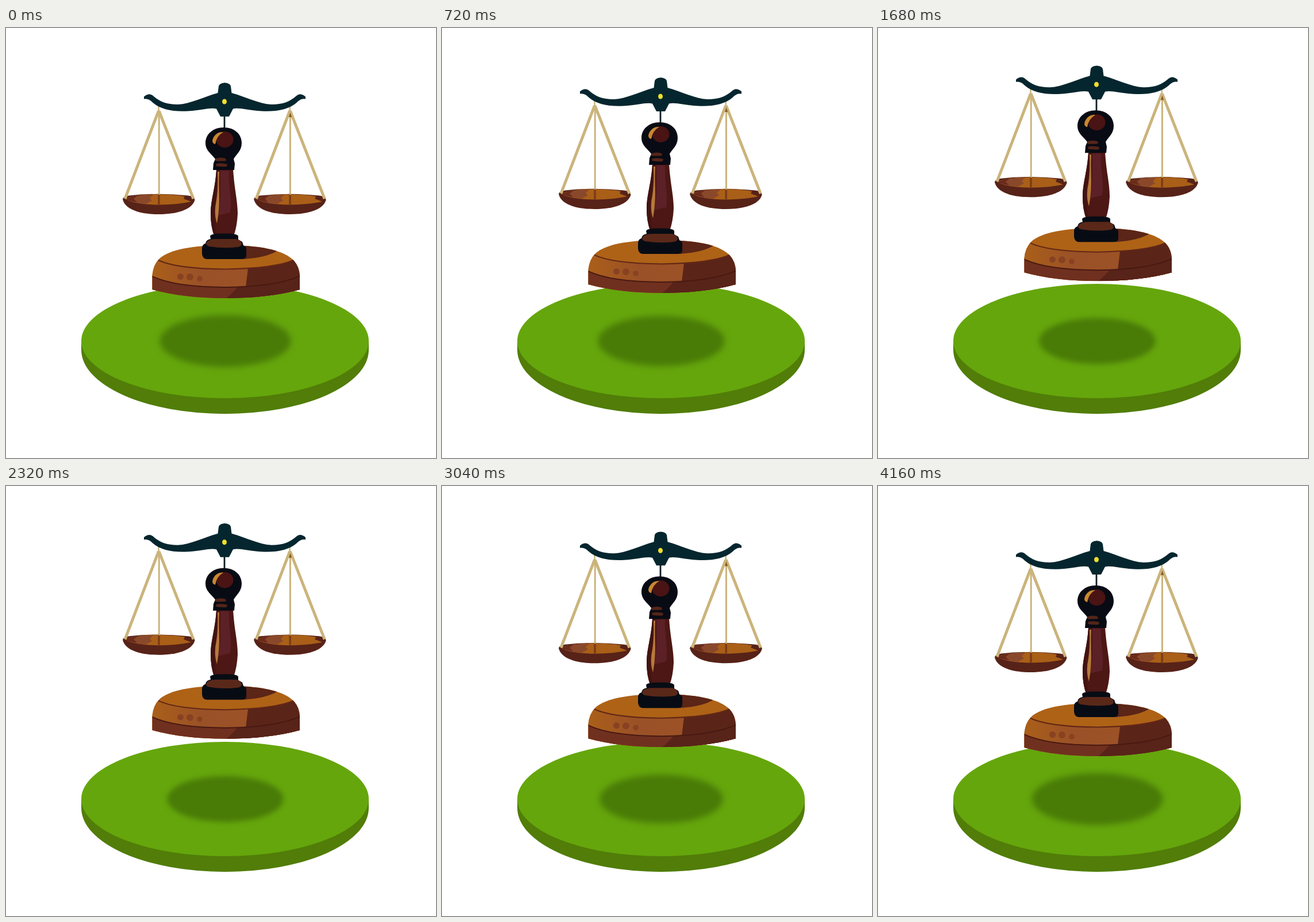
These frames come from a looping animation (748x748 px, 4240 ms). An HTML page:

```html
<!DOCTYPE html>
<html lang="en">
<head>
<meta charset="utf-8">
<title>Floating scales</title>
<style>
  html, body { margin: 0; width: 100%; height: 100%; overflow: hidden; background: #fff; }
  svg { display: block; width: 100%; height: 100%; }
</style>
</head>
<body>
<svg viewBox="0 0 748 748">
  <defs>
    <filter id="soft" x="-20%" y="-30%" width="140%" height="160%" color-interpolation-filters="sRGB">
      <feGaussianBlur stdDeviation="5.500"/>
    </filter>
    <linearGradient id="band">
      <stop offset="0" stop-color="#ab6018"/>
      <stop offset=".35" stop-color="#9a5127"/>
      <stop offset="1" stop-color="#9f5326"/>
    </linearGradient>
    <clipPath id="baseShape">
      <path d="M254.500 455V430Q256 412 267 401C285 385 325 378 382 378C440 378 478 385 498 402Q510 413 511 430V455C475 465 430 470 382 470C335 470 290 465 254.500 455Z"/>
    </clipPath>

    <path id="beamArm" fill="#05262e" d="M379 95.500Q389 95 391 101L392.500 113C418 120 440 132 462 133C482 133 493 128 504 119Q511 111.500 521 119.500V123.500Q513 122 506 129.500C492 142 470 146 444 144.500C420 143 406 138 395 140.500L388 154H379Z"/>

    <g id="pan">
      <path d="M203 298Q203 293 214 291.500Q265 286 317 291.500Q328 293 328.500 299C324 315 300 324 265.500 324C231 324 207 315 203 298Z" fill="#572218"/>
      <path d="M208 298Q212 293 232 291Q265 287.500 300 291L311 293L309 297L322 302Q300 307 266 307.500Q225 307 208 298Z" fill="#a95f17"/>
      <path d="M208 298Q212 293 232 291L256 290L250 296L254 300L243 306Q220 304 208 298Z" fill="#8a482b"/>
      <path d="M208 298Q214 293 230 291L222 297L228 303Q214 301 208 298Z" fill="#6a2b1b"/>
      <path d="M266 288V307" stroke="#7b3d16" stroke-width="3.500"/>
      <g fill="none" stroke="#cbb47c">
        <path d="M265.500 136V150" stroke-width="2.500"/>
        <path d="M266.200 146V290" stroke-width="3"/>
        <path d="M265.500 144L207 297M266 144L326 297" stroke-width="5"/>
      </g>
    </g>
  </defs>

  <path d="M131 545V560A250 111.200 0 0 0 631 560V545Z" fill="#517d08"/>
  <ellipse cx="381" cy="544.500" rx="250" ry="99.500" fill="#65a60c"/>
  <g id="shadow">
    <ellipse rx="114" ry="45" fill="#497b07" filter="url(#soft)"/>
  </g>

  <g id="scales">
    <!-- wooden base -->
    <g clip-path="url(#baseShape)">
      <path d="M250 370H515V475H250Z" fill="#ae6216"/>
      <path d="M414 378Q450 379 473 387Q455 399 414 402Z" fill="#5b2517"/>
      <path d="M250 398Q285 419 382 419Q470 419 506 400V475H250Z" fill="url(#band)"/>
      <path d="M421 418Q475 415 502 402L515 400V475H414Z" fill="#5a2518"/>
      <path d="M250 431Q295 451 382 451Q470 450 515 430V475H250Z" fill="#70301f"/>
      <path d="M403 450Q470 448 515 430V475H377Q395 461 403 450Z" fill="#582319"/>
      <g fill="none" stroke="#632716" stroke-width="2">
        <path d="M263 403Q295 419 382 419.500Q470 418 502 403"/>
        <path d="M254 432Q295 451 382 451Q470 450 512 431" stroke="#481912"/>
      </g>
      <g fill="#884222">
        <circle cx="303.500" cy="432.500" r="5.500"/>
        <circle cx="320" cy="433" r="6"/>
        <circle cx="337" cy="436" r="4.800"/>
      </g>
    </g>

    <!-- foot and shaft -->
    <path d="M366 245H395C397 280 403 300 403 323Q402 345 396 362H362Q356 345 356 323C356 299 364 280 366 245Z" fill="#4c1714"/>
    <path d="M373 248H388C387 280 394 295 390 321L369 326C374 305 373 280 373 248Z" fill="#5c2027"/>
    <path d="M366 247H371C370 285 362 300 362 323Q362 345 367 360H362Q356 345 356 323C356 299 364 280 366 247Z" fill="#421311"/>
    <path d="M368 250H371C369 285 374 300 367 340Q361 322 366 300Q369 280 368 250Z" fill="#b67a3b"/>
    <path d="M355 362Q357 357 380 357.500Q402 357 404 362V368L411 372L413 378L418 382V397Q417 402 410 402H350Q342 402 341 393V382Q342 376 347 375Q348 368 356 367Z" fill="#070c14"/>
    <path d="M350 371Q357 367 364 367H400Q408 368 410 375Q410 380 403 381Q378 384 354 380Q345 378 350 371Z" fill="#5a2819"/>

    <!-- knob -->
    <path d="M380 153V176" stroke="#111c23" stroke-width="2.800"/>
    <path d="M378.500 173C398 173 410 185 410 200C410 214 400 220 396 228L398 236L397 247H360L361 235L364 228C359 220 347 214 347 200C347 185 360 173 378.500 173Z" fill="#080b14"/>
    <ellipse cx="380.500" cy="194" rx="15" ry="14" fill="#491413"/>
    <path d="M378 181Q367 180 361 190Q356 200 364 202Q366 188 378 181Z" fill="#c88830"/>
    <path d="M365 227Q374 224 382 227L383 231Q372 232 363 231ZM366 236Q376 234 385 237L384 241Q374 242 365 240Z" fill="#542519"/>

    <!-- pans and beam -->
    <use href="#pan"/>
    <use href="#pan" x="228.200"/>
    <path d="M494.500 147L497 155H492Z" fill="#8b5a20"/>
    <use href="#beamArm"/>
    <use href="#beamArm" transform="matrix(-1 0 0 1 761 0)"/>
    <ellipse cx="380" cy="128" rx="4" ry="4.500" fill="#f0df2b"/>
  </g>
</svg>
<script>
  const LOOP = 4240, STEP = 80, SWING = 4040, RISE = 32, SHRINK = 0.12;
  const scales = document.getElementById('scales');
  const shadow = document.getElementById('shadow');
  const start = performance.now();

  function draw(ms) {
    const time = Math.min(Math.floor(ms % LOOP / STEP) * STEP, SWING);
    const lift = (1 - Math.cos(2 * Math.PI * time / SWING)) / 2;
    scales.setAttribute('transform', `translate(0 ${-RISE * lift})`);
    shadow.setAttribute('transform', `translate(381.5 544.5) scale(${1 - SHRINK * lift})`);
  }

  function tick() {
    draw(performance.now() - start);
    requestAnimationFrame(tick);
  }
  tick();
</script>
</body>
</html>
```
